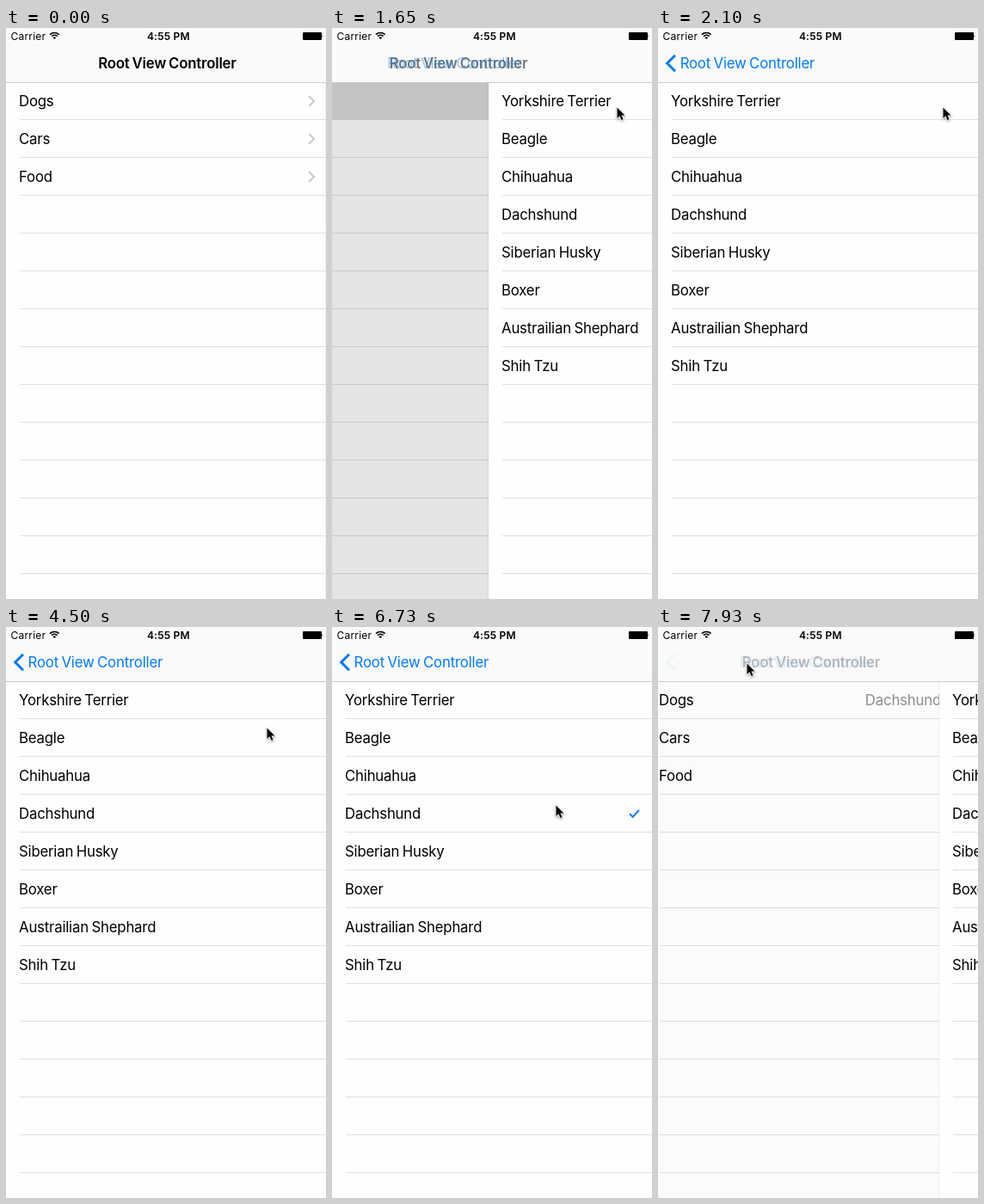
An HTML page for the animation above (8 s loop, 372x664 px).

```html
<!DOCTYPE html>
<html lang="en">
<head>
<meta charset="utf-8">
<title>Root View Controller</title>
<style>
  html, body { margin: 0; height: 100%; overflow: hidden; background: #fefefe; }
  svg { display: block; }
  text { font: 16.8px Inter, "Liberation Sans", sans-serif; letter-spacing: -.2px; word-spacing: -1px; }
  .title { font-weight: 600; text-anchor: middle; }
  .status { font-size: 12px; letter-spacing: .2px; word-spacing: 0; }
  .clock { font-weight: 600; text-anchor: middle; }
  .note { fill: #8e8e93; text-anchor: end; }
  .line { fill: none; stroke-linejoin: miter; }
  #cursor { filter: drop-shadow(0 1px 1px rgba(0, 0, 0, .4)); }
</style>
</head>
<body>
<svg width="372" height="664" viewBox="0 0 372 664">
  <g id="root"></g>
  <rect id="dim" width="372" height="664"/>
  <g id="detail"></g>

  <rect width="372" height="63" fill="#fafafa"/>
  <rect y="63" width="372" height="1" fill="#cbcbcb"/>
  <text id="title" class="title" y="47">Root View Controller</text>
  <text id="back" y="47" fill="#007aff">Root View Controller</text>
  <path id="arrow" class="line" d="M20 31.8L10.7 41L20 50.2" stroke="#007aff" stroke-width="3"/>

  <text class="status" x="5.5" y="14">Carrier</text>
  <g class="line" stroke="#000" stroke-width="1.7">
    <path d="M51 7.7a7.5 7.5 0 0 1 10.6 0M53 9.7a4.7 4.7 0 0 1 6.6 0"/>
    <path d="M56.3 13l-1.8-1.8a2.6 2.6 0 0 1 3.6 0z" fill="#000" stroke="none"/>
  </g>
  <text class="status clock" x="188.8" y="14">4:55 PM</text>
  <rect x="345" y="5" width="22" height="9" rx="1" fill="#000"/>
  <path d="M367.5 8q1.6 1.5 0 3z"/>

  <path id="cursor" d="M0 0V12.4L2.9 9.7L5 14.6L7.1 13.7L5 8.9H9z"
        stroke="#fff" stroke-width="1.6" paint-order="stroke"/>
</svg>
<script>
const W = 372, LOOP = 8000, STEP = 150;
const PUSH = 1650, POP = 7780;
const PUSH_START = 1556, POP_START = 7730;
const el = id => document.getElementById(id);
const clamp = n => Math.max(0, Math.min(1, n));

// time, x, y of the pointer; it jumps from one place to the next
const pointer = [
  [1050, 355, 89], [1200, 330, 92], [4500, 302, 117], [4640, 271, 155],
  [5090, 278, 135], [5240, 280, 131], [6130, 270, 181], [6280, 263, 206],
  [6430, 259, 207], [7180, 229, 170], [7330, 103, 44], [7480, 102, 42]
];

const rowTop = i => 63 + 44 * i;

function table(names, extra) {
  let s = `<rect width="${W}" height="664" fill="#fefefe"/>` + extra;
  for (let i = 0; i < 13; i++) {
    s += `<rect x="16" y="${rowTop(i) + 43}" width="500" height="1" fill="#e0e0e2"/>`;
    if (names[i]) s += `<text x="15" y="${rowTop(i) + 27.7}">${names[i]}</text>`;
  }
  return s;
}

const chevrons = [0, 1, 2].map(i => `M352 ${rowTop(i) + 16}l6 6l-6 6`).join('');
el('root').innerHTML = table(['Dogs', 'Cars', 'Food'],
  `<rect id="pressed" y="63" width="${W}" height="44" fill="#d9d9d9"/>
   <path class="line" d="${chevrons}" stroke="#c7c7cc" stroke-width="2"/>
   <text id="note" class="note" x="343" y="90.7">Dachshund</text>`);
el('detail').innerHTML = table(
  ['Yorkshire Terrier', 'Beagle', 'Chihuahua', 'Dachshund', 'Siberian Husky',
   'Boxer', 'Austrailian Shephard', 'Shih Tzu'],
  `<rect x="-1" width="1" height="664" opacity=".05"/>
   <path id="check" class="line" d="M346 22.2l3.7 3.6l7.3-8" stroke="#007aff" stroke-width="2"/>`);

// critically damped spring: 1 at the start, falling to 0
function spring(ms) {
  const a = ms * Math.sqrt(1000 / 3) / 1000;
  return (1 + a) * Math.exp(-a);
}

const snap = (t, from) => from + Math.floor((t - from) / STEP) * STEP;
const show = (id, on) => el(id).setAttribute('visibility', on ? 'visible' : 'hidden');
const fade = (id, a) => el(id).setAttribute('opacity', clamp(a));
const move = (id, x, y = 0) => el(id).setAttribute('transform', `translate(${x} ${y})`);

function draw(t) {
  const popping = t >= POP;
  let open = 0, title = 1, back = 0, arrow = 0, dim = 0;
  if (popping) {
    const ms = snap(t, POP) - POP_START;
    open = spring(ms);
    title = (ms - 140) / 240;
    back = 1 - ms / 230;
    arrow = 1 - ms / 210;
    dim = .1 * open;
  } else if (t >= PUSH) {
    const ms = snap(t, PUSH) - PUSH_START;
    open = 1 - spring(ms);
    title = 1 - ms / 200;
    back = ms / 220;
    arrow = (ms - 100) / 350;
    dim = .1;
  }

  const edge = Math.round(W * (1 - open));
  move('detail', edge);
  move('root', -Math.ceil((W - edge) * .3));
  fade('dim', dim);
  show('pressed', t >= PUSH && !popping);
  show('note', popping);

  el('title').setAttribute('x', 187.5 - 79 * open);
  el('back').setAttribute('x', 25.6 + 79 * (1 - open));
  fade('title', title);
  fade('back', back);
  fade('arrow', arrow);

  show('check', t >= 5240);
  move('check', 0, rowTop(t < 6730 ? 1 : 3));

  const at = pointer.filter(p => p[0] <= t).pop();
  show('cursor', at);
  if (at) move('cursor', at[1] + 1.5, at[2] + .5);
}

function frame() {
  draw(performance.now() % LOOP);
  requestAnimationFrame(frame);
}
frame();
</script>
</body>
</html>
```
